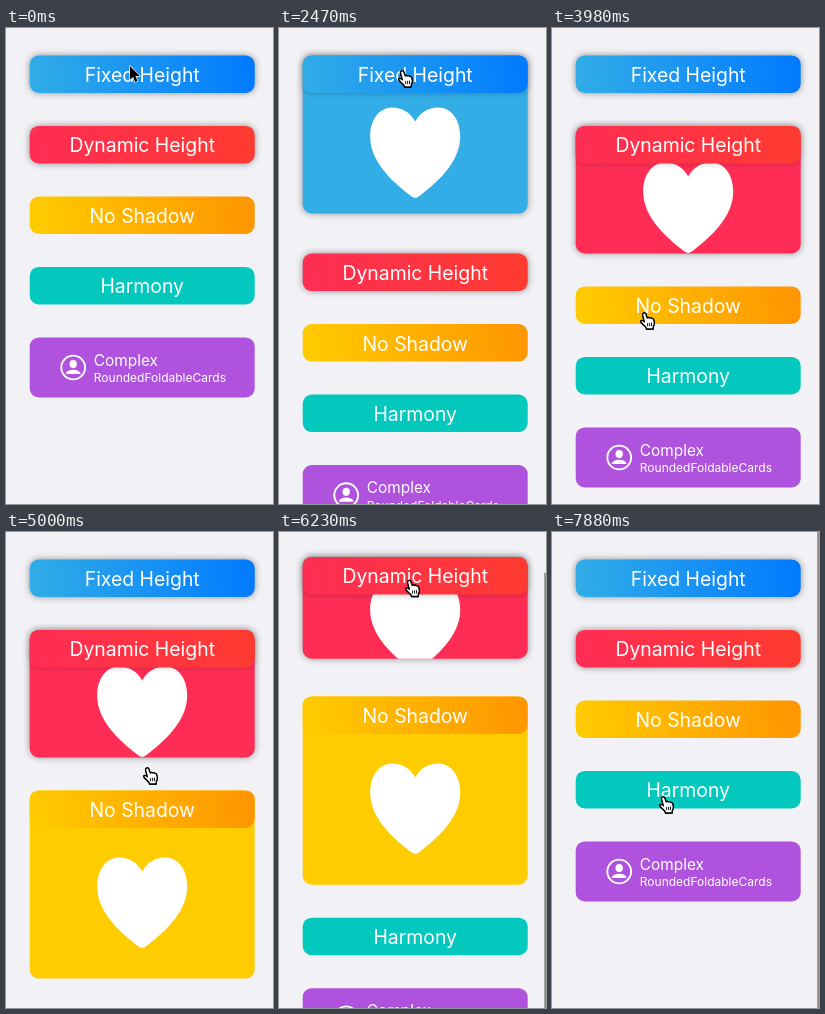
These frames come from a looping animation (267x476 px, 8000 ms). An HTML page with a canvas:

```html
<!DOCTYPE html>
<html lang="en">
<head>
<meta charset="utf-8">
<title>Expandable cards</title>
<style>
html, body { margin: 0; width: 100%; height: 100%; overflow: hidden; background: #f2f1f6; }
canvas { display: block; width: 267px; height: 476px; }
</style>
</head>
<body>
<canvas id="stage"></canvas>
<script>
const W = 267, H = 476, LOOP = 8000, MOVE = 300;
const LEFT = 23.7, WIDTH = 225, MID = LEFT + WIDTH / 2;
const HEAD = 37.5, GAP = 33, TOP = 27.4;
const FONT = 'Inter, Roboto, sans-serif';
const canvas = document.getElementById('stage');
const ctx = canvas.getContext('2d');
const dpr = window.devicePixelRatio || 1;
canvas.width = W * dpr;
canvas.height = H * dpr;

// extra: height gained when open, between the times opens and closes
const cards = [
  { label: 'Fixed Height', from: '#32ade6', to: '#007aff', shadow: true,
    extra: 150.7, opens: 850, closes: 2385 },
  { label: 'Dynamic Height', from: '#ff2d55', to: '#ff3b30', shadow: true,
    extra: 90, opens: 3350, closes: 6125 },
  { label: 'No Shadow', from: '#ffcc00', to: '#ff9500',
    extra: 150.7, opens: 4290, closes: 7090 },
  { label: 'Harmony', from: '#03c8be', to: '#03c8be' },
  { from: '#af52de', to: '#af52de', head: 60 }
];

// where the hand goes, and when it sets off
const DRAG = 5000;
const moves = [
  { at: 2745, x: 108, y: 108 },
  { at: 3680, x: 88, y: 284 },
  { at: 4490, x: 137, y: 235 },
  { at: DRAG, x: 137, y: 152 },
  { at: 5570, x: 126, y: 47.5 },
  { at: 6290, x: 124, y: 104 },
  { at: 6590, x: 120, y: 134 },
  { at: 7570, x: 107, y: 264 }
];

// eased 0..1 over one move
function step(t, start) {
  const u = Math.min(1, Math.max(0, (t - start) / MOVE));
  return u * u * (3 - 2 * u);
}

const openness = (card, t) => card.extra ? step(t, card.opens) - step(t, card.closes) : 0;

// a drag, then two clamps as the content shrinks
const scrollAt = t => 73 * step(t, DRAG) - 15.5 * step(t, 6250) - 57.5 * step(t, 7200);

function handAt(t) {
  let x = 119, y = 42;
  for (const m of moves) {
    const p = step(t, m.at);
    x += (m.x - x) * p;
    y += (m.y - y) * p;
  }
  return [x, y];
}

function box(y, h) {
  ctx.beginPath();
  ctx.roundRect(LEFT, y, WIDTH, h, 9);
}

function fillBox(y, h, fill, shade) {
  ctx.save();
  ctx.shadowColor = `rgba(0,0,0,${shade})`;
  ctx.shadowBlur = 7 * dpr;
  ctx.fillStyle = fill;
  box(y, h);
  ctx.fill();
  ctx.restore();
}

function text(str, x, y, size, align) {
  ctx.font = `400 ${size}px ${FONT}`;
  ctx.textAlign = align;
  ctx.fillStyle = '#fff';
  ctx.fillText(str, x, y);
}

function heart(cx, y) {
  ctx.fillStyle = '#fff';
  ctx.beginPath();
  for (const s of [-1, 1]) {
    const curve = (a, b, c, d, e, f) =>
      ctx.bezierCurveTo(cx + s * a, y + b, cx + s * c, y + d, cx + s * e, y + f);
    ctx.moveTo(cx, y + 14);
    curve(5, 5, 13, 0, 23, 0);
    curve(36, 0, 45, 12, 45, 29);
    curve(45, 52, 27, 71, 5, 88);
    curve(3, 89.6, 1.5, 90.4, 0, 90.4);
    ctx.closePath();
  }
  ctx.fill();
  // hide the seam between the halves
  ctx.fillRect(cx - 0.6, y + 15, 1.2, 74);
}

function person(cx, cy) {
  ctx.strokeStyle = ctx.fillStyle = '#fff';
  ctx.lineWidth = 1.9;
  ctx.beginPath();
  ctx.arc(cx, cy, 11.9, 0, 7);
  ctx.stroke();
  ctx.beginPath();
  ctx.ellipse(cx, cy - 3.4, 3.7, 4.1, 0, 0, 7);
  ctx.fill();
  ctx.beginPath();
  ctx.ellipse(cx, cy + 6.5, 7.4, 4.2, 0, Math.PI, 0);
  ctx.fill();
}

function drawCard(card, y, p) {
  const head = card.head || HEAD;
  if (p > 0) {
    const h = head + card.extra * p;
    fillBox(y, h, card.from, card.shadow ? 0.4 : 0);
    ctx.save();
    box(y, h);
    ctx.clip();
    heart(MID, y + (head + h) / 2 - 45.8);
    ctx.restore();
  }
  const fill = ctx.createLinearGradient(LEFT, y + head, LEFT + WIDTH, y);
  fill.addColorStop(0, card.from);
  fill.addColorStop(1, card.to);
  // over an open body the header casts a fainter shadow
  fillBox(y, head, fill, card.shadow ? 0.42 - 0.22 * p : 0);
  if (card.label) {
    text(card.label, MID, y + 26.5, 19.4, 'center');
  } else {
    person(67.2, y + 30.1);
    text('Complex', 87.8, y + 28.3, 15.4, 'left');
    text('RoundedFoldableCards', 87.8, y + 44.6, 12, 'left');
  }
}

const arrow = new Path2D('M0 0V13.8L3.1 11L5.2 16L7.5 15L5.4 10.1H9.7Z');
const hand = new Path2D('M3 1.5C4 .5 5.3 .8 5.8 2L7.2 6Q8.3 5 9.4 6Q10.7 5.2 11.6 6.5' +
  'Q13 6 13.6 7.6L14.3 10.5Q14.5 13 13.2 14.5V17H6.5L6 15.3Q3.5 13 1 10.2' +
  'Q.2 8.7 1.6 8.3Q2.8 8.2 4.4 9.8L2.6 3Q2.4 2 3 1.5Z');
const knuckles = new Path2D('M7.6 11V14.2M9.6 10.8V14.2M11.5 10.6V14');

function pointer(shape, [x, y], fill, line) {
  ctx.save();
  ctx.translate(x, y);
  ctx.lineJoin = 'round';
  ctx.lineWidth = 1.3;
  ctx.fillStyle = fill;
  ctx.strokeStyle = line;
  ctx.stroke(shape);
  ctx.fill(shape);
  if (shape === hand) {
    ctx.stroke(shape);
    ctx.lineWidth = 0.9;
    ctx.stroke(knuckles);
  }
  ctx.restore();
}

function scrollBar(t, offset) {
  const dragging = t > DRAG + 10 && t < DRAG + 495;
  if (!dragging && t < 6125) return;
  const top = offset * 0.56;
  ctx.fillStyle = 'rgba(0,0,0,.42)';
  ctx.fillRect(265.2, top, 1.8, dragging ? 355 : H - top);
}

function draw(t) {
  ctx.setTransform(dpr, 0, 0, dpr, 0, 0);
  ctx.fillStyle = '#f2f1f6';
  ctx.fillRect(0, 0, W, H);
  const offset = scrollAt(t);
  let y = TOP - offset;
  for (const card of cards) {
    drawCard(card, y, openness(card, t));
    // the layout below trails the card slightly
    y += (card.head || HEAD) + GAP + (card.extra || 0) * openness(card, t - 12);
  }
  scrollBar(t, offset);
  if (t < 300) pointer(arrow, [124, 38], '#000', '#fff');
  else pointer(hand, handAt(t), '#fff', '#000');
}

const start = performance.now();
function tick() {
  draw((performance.now() - start) % LOOP);
  requestAnimationFrame(tick);
}
tick();
</script>
</body>
</html>
```
